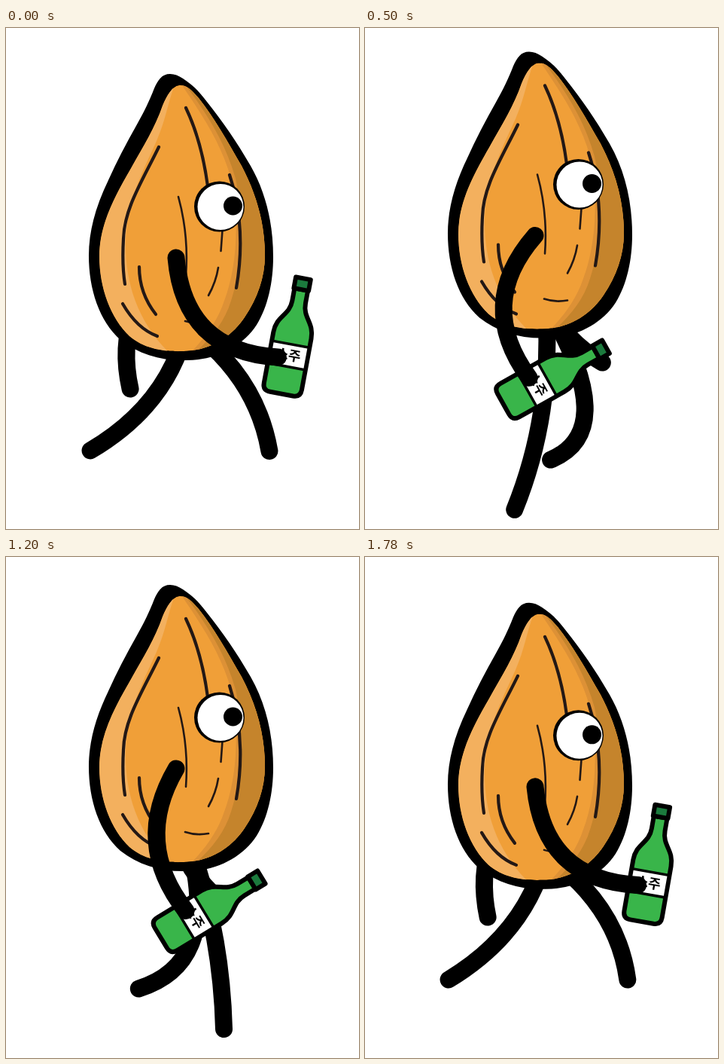
Animation, 469 px wide and 665 px high, one loop 1800 ms. Source, as an HTML page:

```html
<!DOCTYPE html>
<html lang="ko">
<head>
<meta charset="utf-8">
<title>Walking almond</title>
<style>
  html, body { margin: 0; width: 100%; height: 100%; overflow: hidden; background: #fff; }
  svg { display: block; width: 469px; height: 665px; }
  .limb { fill: none; stroke: #000; stroke-width: 23; stroke-linecap: round; }
  .grain { fill: none; stroke: #231815; stroke-width: 4.2; stroke-linecap: round; }
  .grain .fine { stroke-width: 2.6; }
  .glass { stroke: #000; stroke-width: 6; stroke-linejoin: round; }
  text { font: bold 18px "Noto Sans CJK KR", "Noto Sans CJK", sans-serif; text-anchor: middle; }
</style>
</head>
<body>
<svg viewBox="0 0 469 665">
  <defs>
    <path id="shell" d="M230 76 C221 77 214 89 208 103 C198 132 183 156 165 188 C143 226 124 262 124 303
      C124 345 139 385 164 409 C184 426 210 430 236 429 C270 428 298 412 317 384
      C334 359 344 331 344 302 C344 258 332 219 313 183 C294 150 276 118 256 93 C246 81 239 75 230 76 Z"/>
    <clipPath id="inside"><use href="#shell"/></clipPath>
  </defs>

  <path class="limb" id="legA"/>
  <path class="limb" id="legB"/>
  <path class="limb" id="armBack"/>

  <g id="body">
    <path d="M218 61 C207 61 202 69 197 80 C190 98 184 110 174 128 C160 153 147 177 136 202
      C120 235 110 268 110 302 C110 347 124 389 152 414 C176 433 206 442 240 441
      C279 441 314 423 333 394 C348 370 355 337 355 304 C355 259 345 218 325 183
      C306 150 287 123 267 98 C256 83 246 74 235 67 C229 63 224 61 218 61 Z"/>
    <g clip-path="url(#inside)">
      <use href="#shell" fill="#f09f38"/>
      <path fill="#f3b05e" d="M226 70 C215 98 213 120 200 150 C180 194 160 232 159 284
        C158 336 174 392 222 436 H100 V70 Z"/>
      <path fill="#dd9136" d="M230 70 C252 104 284 146 299 200 C311 258 306 320 290 362
        C280 392 262 414 242 434 H370 V70 Z"/>
      <path fill="#c5842c" d="M234 70 C260 104 290 146 305 200 C317 256 314 316 299 362
        C290 392 270 414 248 434 H370 V70 Z"/>
    </g>
    <g class="grain">
      <path d="M239 106 Q260 150 268 210"/>
      <path d="M203 158 C180 205 157 240 156 280 Q154 315 158 340"/>
      <path d="M177 317 Q177 352 199 380"/>
      <path d="M155 366 Q174 399 201 409"/>
      <path d="M297 195 Q320 265 306 345"/>
      <path class="fine" d="M229 224 Q243 275 239 329"/>
      <path class="fine" d="M288 262 L285.500 296"/>
      <path class="fine" d="M282 318 Q279 337 269 355"/>
      <path class="fine" d="M238 389 Q253 394 269 391"/>
    </g>
    <circle cx="283.500" cy="237" r="33.500"/>
    <circle cx="285" cy="237.500" r="30.500" fill="#fff"/>
    <circle cx="301.500" cy="236" r="12.500"/>
  </g>

  <g id="bottle">
    <path class="glass" fill="#39b54a" d="M5 -94 V-77 C5 -57 -12 -54 -12 -32 V37
      Q-12 47 -2 47 H29 Q39 47 39 37 V-32 C39 -54 23 -57 23 -77 V-94 Z"/>
    <path class="glass" fill="#1b7a3d" d="M4 -109 H24 V-94 H4 Z"/>
    <path fill="#fff" stroke="#000" stroke-width="3.500" d="M-11 -20 H38 V10 H-11 Z"/>
    <text x="13" y="1">소주</text>
  </g>
  <path class="limb" id="armFront"/>
</svg>

<script>
const LOOP = 1800, STEP = 20;
const RAD = Math.PI / 180;
const el = id => document.getElementById(id);

// Mean plus harmonics, each given as [amplitude, time of its peak]
const wave = (t, mean, ...parts) => parts.reduce((sum, [amp, peak], i) =>
  sum + amp * Math.cos((i + 1) * 2 * Math.PI * (t - peak) / LOOP), mean);

function curve(id, x, y, cx, cy, ex, ey) {
  el(id).setAttribute('d', `M${x} ${y} Q${cx} ${cy} ${ex} ${ey}`);
}

function leg(id, t, lift) {
  const footX = wave(t, 228, [119, -8], [8, 170]);
  const footY = wave(t, 585, [28, 430], [24, 430], [8, 430]);
  const kneeX = wave(t, 285, [68, -157], [11, 490]);
  const kneeY = wave(t, 502, [25, 1093], [22, 440]);
  curve(id, 240, 395 + lift, kneeX, kneeY, footX, footY);
}

// Swing is measured from straight down; bend is the angle between chord and forearm
function arm(id, x, y, swing, bend) {
  const length = 189, half = length / 2, out = half * Math.tan(bend * RAD);
  const s = Math.sin(swing * RAD), c = Math.cos(swing * RAD);
  const hand = [x + length * s, y + length * c];
  curve(id, x, y, x + half * s - out * c, y + half * c + out * s, ...hand);
  return hand;
}

function draw(t) {
  const lift = wave(t, -16, [2, 0], [14, 0]);
  const swing = wave(t, 12.5, [34.5, -78]);
  const tilt = wave(t, 46, [-33.5, -60], [-3, -60]);

  el('body').setAttribute('transform', `translate(0 ${lift})`);
  leg('legA', t, lift);
  leg('legB', t + LOOP / 2, lift);
  arm('armBack', 234, 303 + lift, wave(t, 10, [-33, -90]), 34);
  const hand = arm('armFront', 226, 305 + lift, swing, 97 - swing - tilt);
  el('bottle').setAttribute('transform', `translate(${hand}) rotate(${tilt})`);
}

const start = performance.now();
function tick() {
  const t = (performance.now() - start) % LOOP;
  draw(Math.floor(t / STEP) * STEP);
  requestAnimationFrame(tick);
}
tick();
</script>
</body>
</html>
```
